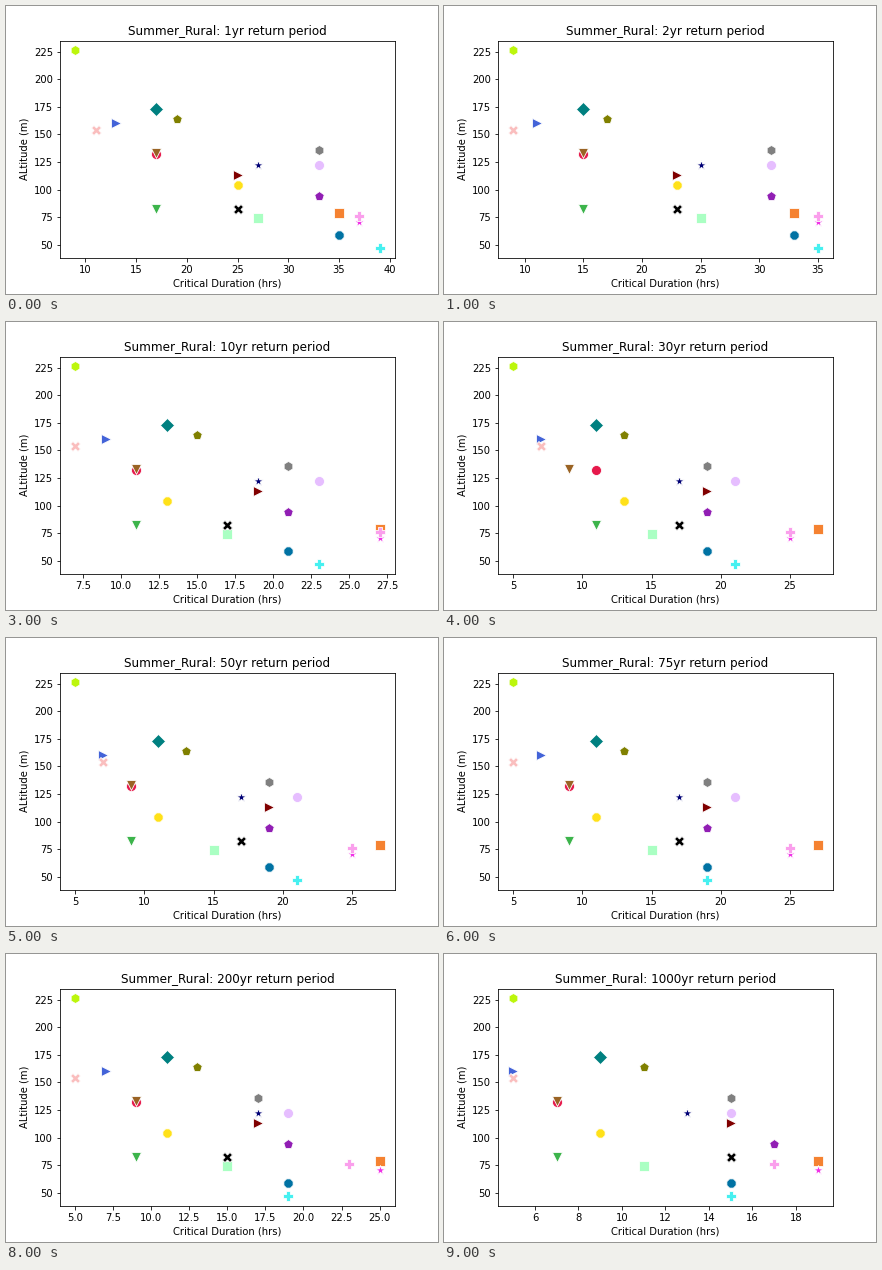
Recreate the animation shown at these times as a matplotlib script. Size 432 by 288 pixels, loop 10 s.

```python
import math
from itertools import cycle

import matplotlib.pyplot as plt
from matplotlib.animation import FuncAnimation

PERIODS = [1, 2, 5, 10, 30, 50, 75, 100, 200, 1000]
MARKERS = "ov8>spP*hXD"
SIZE = 100

# colour, altitude, then duration for frequent, typical and rare storms
SITES = [
    ("#e6194b", 132, 17, 10.1, 7),
    ("#3cb44b", 82, 17, 10.1, 7),
    ("#ffe119", 104, 25, 12.1, 9),
    ("#4363d8", 160, 13, 7.6, 5),
    ("#f58231", 79, 35, 26.55, 19),
    ("#911eb4", 94, 33, 20, 17),
    ("#46f0f0", 47, 39, 20.2, 15),
    ("#f032e6", 71, 37, 25.6, 19),
    ("#bcf60c", 226, 9, 5.8, 5),
    ("#fabebe", 154, 10.8, 6.04, 5),
    ("#008080", 173, 17, 11.6, 9),
    ("#e6beff", 122, 33, 21.2, 15),
    ("#9a6324", 133, 17, 9.6, 7),
    ("#0072a3", 59, 35.5, 20, 15),
    ("#800000", 113, 25, 18.7, 15),
    ("#aaffc3", 74, 27, 15.5, 11),
    ("#808000", 164, 19, 13.6, 11),
    ("#fa9fec", 76, 37, 24.5, 17),
    ("#000075", 122, 27, 17, 13),
    ("#808080", 136, 33, 18.6, 15),
    ("#000000", 82, 25, 16.2, 15),
]


def duration(period, frequent, typical, rare):
    """Quick fall to the typical level, late fall to the rare one, in odd hours."""
    early = math.exp(-0.23 * (period - 1))
    late = (math.log(period) / math.log(PERIODS[-1])) ** 6
    hours = typical + (frequent - typical) * early + (rare - typical) * late
    return 2 * math.floor(hours / 2) + 1


fig, ax = plt.subplots(figsize=(6, 4), dpi=72)
fig.subplots_adjust(left=0.125, right=0.9, bottom=0.125, top=0.88)


def draw(i):
    period = PERIODS[i]
    ax.clear()
    for (color, altitude, *levels), marker in zip(SITES, cycle(MARKERS)):
        ax.scatter(duration(period, *levels), altitude, s=SIZE, c=color,
                   marker=marker, edgecolors="white",
                   linewidths=0.08 * math.sqrt(SIZE))
    ax.set_title(f"Summer_Rural: {period}yr return period")
    ax.set_xlabel("Critical Duration (hrs)")
    ax.set_ylabel("ALtitude (m)")
    return []


anim = FuncAnimation(fig, draw, frames=len(PERIODS), init_func=lambda: [],
                     interval=1000, repeat=True, repeat_delay=0)
plt.show()
```
